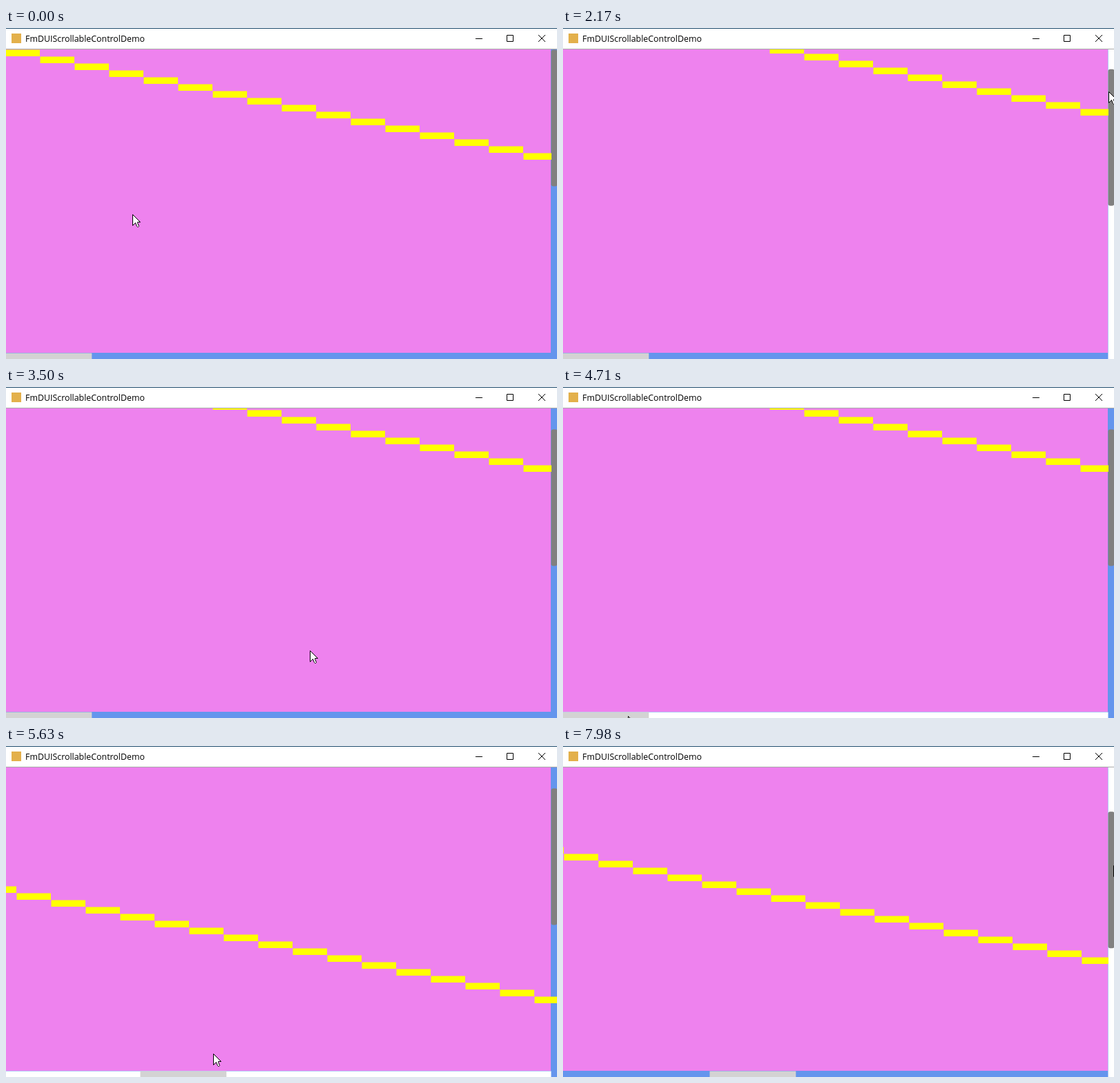
An HTML page for the animation above (8000 ms loop, 798 px wide and 480 px high).

```html
<!DOCTYPE html>
<html lang="en">
<head>
<meta charset="utf-8">
<title>Scrollable control demo</title>
<style>
html, body { margin: 0; width: 100%; height: 100%; overflow: hidden; background: #fff; }
svg { display: block; }
text { font: 12.4px "Open Sans", "Noto Sans", sans-serif; }
</style>
</head>
<body>
<svg width="798" height="480" viewBox="0 0 798 480">
  <defs>
    <clipPath id="view"><rect id="viewRect" y="31" width="790" height="440"/></clipPath>
  </defs>
  <rect width="798" height="480" fill="#fff"/>
  <rect width="798" height="1" fill="#1c4a6b"/>
  <rect y="30" width="798" height="1" fill="#aaa"/>
  <rect x="8" y="8" width="14" height="14" fill="#e3b04b"/>
  <text x="28" y="20">FmDUIScrollableControlDemo</text>
  <g fill="none" stroke="#000">
    <path d="M680 15.5h10M725.5 10.5h9v9h-9z"/>
    <path d="M771 10l10 10M781 10l-10 10"/>
  </g>
  <rect y="31" width="789" height="440" fill="#ee82ee"/>
  <path d="M0 471H789V31H798V480H0Z" fill="#6495ed"/>
  <rect id="hoverH" y="471.5" width="789.5" height="9" fill="#fff"/>
  <rect id="hoverV" x="789.5" y="31" width="9" height="449" fill="#fff"/>
  <rect id="thumbH" y="471.5" width="124.8" height="9" fill="#d3d3d3"/>
  <rect id="thumbV" x="789.5" width="9" height="198" rx="3" fill="#808080"/>
  <g clip-path="url(#view)"><g id="stairs" fill="#ff0"></g></g>
  <path id="cursor" d="M.5 .5V16.5L4.5 12.5L6.5 17.5L7.5 18.5H8.5L9.5 17.5L7.5 12.5V11.5H11.5Z" fill="#fff" stroke="#000"/>
</svg>
<script>
const LOOP = 8000, REFRESH = 133, PHASE = 50;
const VIEW_W = 790, VIEW_H = 440, CONTENT_W = 5000, CONTENT_H = 1000;
const $ = id => document.getElementById(id);
const set = (id, attrs) => {
  for (const name in attrs) $(id).setAttribute(name, attrs[name]);
};

// Each step has a soft top and left edge.
for (let i = 0; i < 100; i++) {
  const step = document.createElementNS("http://www.w3.org/2000/svg", "rect");
  step.id = `step${i}`;
  $("stairs").append(step);
  set(step.id, { x: i * 50 - 0.5, y: i * 10 + 31.5, width: 49.5, height: 9.5 });
}

const linear = p => p;
const easeOut = p => 1 - (1 - p) ** 2;

// Pointer at x, y; content scrolled by left, top.
const initial = { x: 183, y: 270, left: 0, top: 0 };
const gestures = [
  { from: 450, to: 850, top: 150 },                              // wheel
  { from: 850, to: 1380, x: 707, y: 215 },
  { from: 1500, to: 1650, x: 790, y: 130 },
  { from: 1800, to: 2400, y: 70, top: 14 },                      // drag side thumb
  { from: 2450, to: 3100, y: 94, top: 68 },
  { from: 3150, to: 3620, x: 330, y: 472 },
  { from: 3620, to: 4700, x: 94, y: 477 },
  { from: 4750, to: 4990, x: 105 },
  { from: 4990, to: 5901, x: 318, y: 443, left: 1348, ease: easeOut }, // drag bottom thumb
  { from: 6150, to: 7090, x: 781, y: 133 },
  { from: 7250, to: 7350, x: 792, y: 139 },
  { from: 7350, to: 7890, x: 797, y: 173, top: 145 }             // drag side thumb
];

function stateAt(t) {
  const state = { ...initial };
  for (const { from, to, ease = linear, ...goal } of gestures) {
    const p = ease(Math.min(1, Math.max(0, (t - from) / (to - from))));
    for (const key in goal) state[key] += (goal[key] - state[key]) * p;
  }
  for (const key in state) state[key] = Math.round(state[key]);
  return state;
}

const within = (t, from, to) => t >= from && t < to;
const show = (id, visible) => set(id, { visibility: visible ? "visible" : "hidden" });

function draw(time) {
  // The picture refreshes in steps rather than continuously.
  const t = Math.max(0, Math.floor((time - PHASE + 10) / REFRESH) * REFRESH + PHASE);
  const { x, y, left, top } = stateAt(t);

  show("hoverV", within(t, 1640, 3250) || t >= 7300);
  show("hoverH", within(t, 3600, 6050));
  set("thumbV", { y: 31.5 + top * VIEW_H / CONTENT_H });
  set("thumbH", { x: left * VIEW_W / CONTENT_W - 0.5 });
  set("stairs", { transform: `translate(${-left} ${-top})` });
  // Content spills over the side bar until that bar is painted again.
  const spills = within(t, 450, 1640) || within(t, 4850, 7300);
  set("viewRect", { width: spills ? 798 : 790 });
  set("cursor", { transform: `translate(${x} ${y})` });
}

const start = performance.now();
function tick() {
  draw((performance.now() - start) % LOOP);
  requestAnimationFrame(tick);
}
tick();
</script>
</body>
</html>
```
